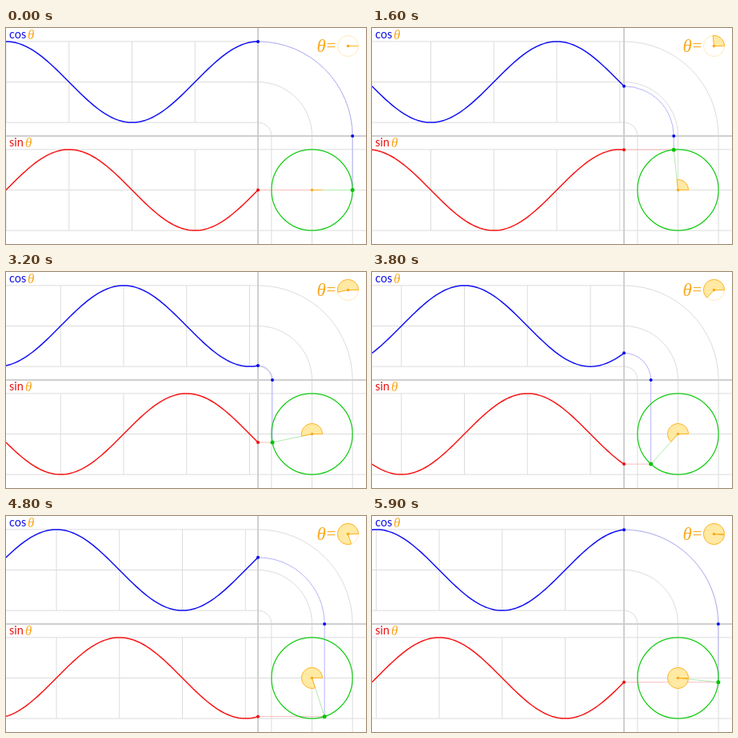
An HTML page that plays this animation: 450 px wide and 270 px high, repeating every 6 s.

```html
<!DOCTYPE html>
<html lang="en">
<head>
<meta charset="utf-8">
<title>Sine and cosine on the unit circle</title>
<style>
html, body { margin: 0; width: 100%; height: 100%; overflow: hidden; background: #fff; }
svg { display: block; width: 450px; height: 270px; }
path, circle { fill: none; }
.grid { stroke: #dcdcdc; }
.axis { stroke: #cfcfcf; stroke-width: 2; }
.wave { stroke-width: 1.5; stroke-linejoin: round; }
.wedge { fill: #ffe9a3; stroke: #fcb322; stroke-linejoin: round; }
.label { font: 14.5px Lato, "Open Sans", sans-serif; }
.theta { font: italic 17px "Liberation Serif", "Times New Roman", serif; fill: #f9a81c; }
.big { font-size: 23px; }
.equals { font-style: normal; font-size: 21px; }
</style>
</head>
<body>
<svg viewBox="0 0 450 270">
  <path id="grid" class="grid"/>
  <path id="ticks" class="grid"/>
  <path class="axis" d="M315 0V270M0 135H450"/>

  <path id="cosGuide" stroke="#b3b3fa"/>
  <path id="sinGuide" stroke="#fbbcbc"/>
  <path id="radius" stroke="#b0e8b0"/>
  <circle cx="382.5" cy="202.5" r="50.625" stroke="#14cc14" stroke-width="1.2"/>
  <path id="cosWave" class="wave" stroke="#1010f4"/>
  <path id="sinWave" class="wave" stroke="#f81414"/>

  <path id="angle" class="wedge"/>
  <circle cx="382.5" cy="202.5" r="1.8" style="fill:#f9a81c"/>
  <circle cx="427.5" cy="22.5" r="13" stroke="#ffe9b8"/>
  <path id="dial" class="wedge"/>
  <circle cx="427.5" cy="22.5" r="1.8" style="fill:#f9a81c"/>

  <circle id="cosFoot" r="2" style="fill:#0808f0"/>
  <circle id="cosHead" r="2" style="fill:#0808f0"/>
  <circle id="sinHead" r="2" style="fill:#f01010"/>
  <circle id="point" r="2.5" style="fill:#08c408"/>

  <text class="label" x="4" y="13" fill="#1010e8">cos</text>
  <text class="theta" x="27" y="13.5">θ</text>
  <text class="label" x="4" y="148" fill="#ee1414">sin</text>
  <text class="theta" x="24" y="148.5">θ</text>
  <text class="theta big" x="388.5" y="29.5">θ</text>
  <text class="theta equals" x="400.5" y="29">=</text>
</svg>
<script>
const LOOP = 6000, STEPS = 60, TAU = 2 * Math.PI;
const AXIS_X = 315, AXIS_Y = 135, PERIOD = 315;
const CX = 382.5, CY = 202.5, R = 50.625, COS_Y = 67.5;

const $ = id => document.getElementById(id);
const draw = (id, d) => $(id).setAttribute("d", d);
const place = (id, x, y) => {
  $(id).setAttribute("cx", x);
  $(id).setAttribute("cy", y);
};

// From the horizontal axis, a quarter turn up to the vertical axis
const quarter = r =>
  `V${AXIS_Y}A${r} ${r} 0 0 0 ${AXIS_X} ${AXIS_Y - r}`;

function wave(fn, mid, theta) {
  let d = "";
  for (let x = 0; x <= AXIS_X; x += 3) {
    const y = mid - R * fn(theta - (AXIS_X - x) / PERIOD * TAU);
    d += (x ? "L" : "M") + x + " " + y.toFixed(2);
  }
  return d;
}

function wedge(x, y, r, theta) {
  if (!theta) return `M${x} ${y}h${r}`;
  const ex = x + r * Math.cos(theta), ey = y - r * Math.sin(theta);
  return `M${x} ${y}h${r}A${r} ${r} 0 ${theta > Math.PI ? 1 : 0} 0 ${ex} ${ey}Z`;
}

function ticks(theta) {
  const gap = PERIOD / 4;
  let d = "";
  for (let x = AXIS_X - theta / TAU * PERIOD % gap; x >= 0; x -= gap) {
    if (x < AXIS_X) {
      for (const mid of [COS_Y, CY]) d += `M${x} ${mid - R}v${2 * R}`;
    }
  }
  return d;
}

function render(theta) {
  const x = CX + R * Math.cos(theta);
  const y = CY - R * Math.sin(theta);
  const reach = x - AXIS_X;

  draw("ticks", ticks(theta));
  draw("cosWave", wave(Math.cos, COS_Y, theta));
  draw("sinWave", wave(Math.sin, CY, theta));
  draw("cosGuide", `M${x} ${y}` + quarter(reach));
  draw("sinGuide", `M${x} ${y}H${AXIS_X}`);
  draw("radius", `M${CX} ${CY}L${x} ${y}`);
  draw("angle", wedge(CX, CY, 13, theta));
  draw("dial", wedge(427.5, 22.5, 13, theta));

  place("cosFoot", x, AXIS_Y);
  place("cosHead", AXIS_X, AXIS_Y - reach);
  place("sinHead", AXIS_X, y);
  place("point", x, y);
}

draw("grid", [-R, 0, R].map(o =>
  `M0 ${COS_Y + o}H${AXIS_X}M0 ${CY + o}H450` +
  `M${CX + o} 270` + quarter(CX + o - AXIS_X)).join(""));

const start = performance.now();
let last = -1;
function tick() {
  const time = (performance.now() - start) % LOOP;
  const step = Math.floor(time / LOOP * STEPS);
  if (step !== last) render(step / STEPS * TAU);
  last = step;
  requestAnimationFrame(tick);
}
tick();
</script>
</body>
</html>
```
